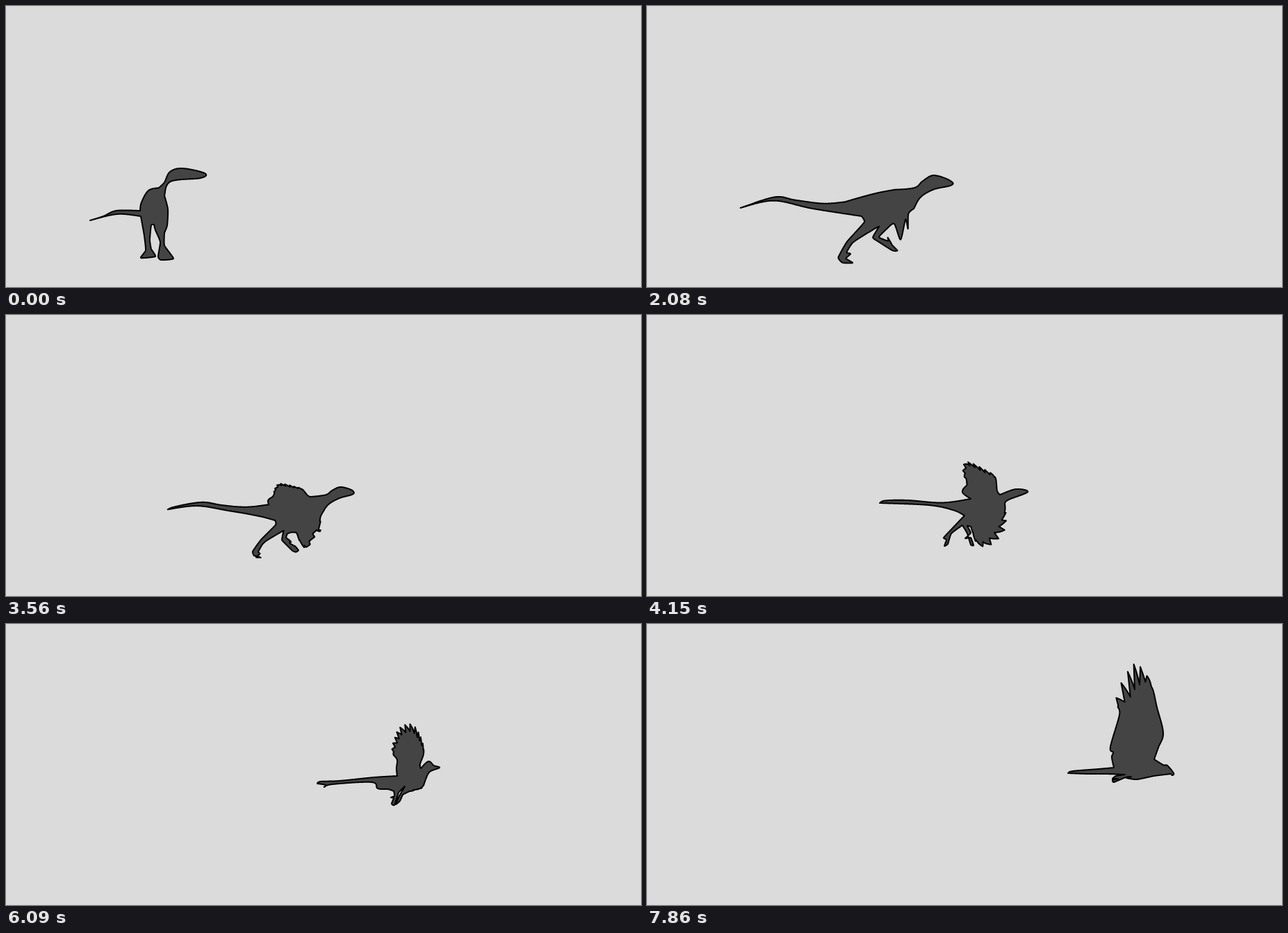
Animation, 914 px wide and 405 px high, one loop 8000 ms. Source, as an HTML page with a canvas:

```html
<!DOCTYPE html>
<html>
<head>
<meta charset="utf-8">
<style>
html, body { margin: 0; height: 100%; overflow: hidden; background: #dbdbdb; }
canvas { display: block; }
</style>
</head>
<body>
<canvas id="stage" width="914" height="405"></canvas>
<script>
// Key points clockwise from the tail tip; parts are split by "|":
// upper tail, back or wing, head, chest or far wing, front leg, back leg, lower tail.
// "~ from to count depth" adds feathers along that stretch of a part.
const theropod = `121,309 140,303 159,295 193,295
| 195,283 205,266 220,262
| 228,254 236,239 254,234 286,241 280,248 237,253 228,273
| 233,293 232,316 228,327
| 228,345 241,364 223,366 219,361 222,340 215,323 213,315
| 209,316 207,337 209,350 215,361 194,363 201,352 199,331 194,303
| 160,300 121,309`;

const raptor = `136,289 188,272.5 220,278 262,283.5 295,281
| 335,272 372,265
| 402,264.5 414,254 430,245 456,254 455,260 431,266 412,278 402,294
| 393,302 392,325 388,309 380,340 370,313 358,321
| 346,332 360,337 359,331 366,342 376,351 368,351 339,336 338,332 348,318
| 325,330 306,341 296,355 302,357 295,364 307,371 291,371 284,363 298,340 326,312 322,303
| 246,291 187,278 136,289`;

const glider = `335,271 343,267.5 375,267 425,270.5 466,265
| 455,257 455,251 461,243 458,230 461,218 469,219 488,228 501,235 504,253 508,259 ~ .24 .85 10 7
| 531,251 548,255 521,266 515,271
| 515,283 505,307 487,326 474,324 466,305 ~ .15 .9 7 11
| 461,304 466,314 458,322 466,321 470,332 466,331 461,315 454,303
| 438,315 433,330 428,333 431,324 427,321 438,309 457,289
| 440,281 405,274 335,271`;

const earlyBird = `448,230 453,227 480,226 530,221 563,219
| 562,208 563,196 558,187 562,174 572,158 586,157 596,171 601,186 596,202 597,208 ~ .22 .85 13 12
| 608,198 616,204 624,207 610,213 604,224
| 601,232 596,237 583,240 571,246 ~ .2 .9 5 2
| 567,255 561,260 566,248 574,234 565,243
| 559,261 555,259 558,251 554,250 559,248 558,241 550,238
| 535,237 526,228 470,231 458,235 460,232 448,230`;

const hawk = `606,215 613,212 650,209 672,207
| 669,192 671,185 667,177 680,131 678,118 690,112 701,101 716,85 727,92 734,120 743,157 736,178 730,195 ~ .36 .59 6 42
| 743,203 749,204 758,215 756,218 754,216
| 730,219 705,224 690,222
| 697,220 689,221 672,228 670,225 678,223
| 670,223 675,219 688,217
| 660,216 635,216 606,215`;

const SAMPLES = 200;
const ROUNDNESS = [.17, .17, .17, .12, .08, .08, .17];

const lerp = ([x, y], [u, v], t) => [x + (u - x) * t, y + (v - y) * t];
const mix = (a, b, t) => a.map((p, i) => lerp(p, b[i], t));

// Spline through the points as path data
function curve(pts, r) {
  const at = i => pts[Math.max(0, Math.min(pts.length - 1, i))];
  const handle = (i, dir) => [0, 1].map(a => at(i)[a] + dir * r * (at(i + 1)[a] - at(i - 1)[a]));
  return 'M' + pts[0] + pts.slice(1).map((p, i) => `C${handle(i, 1)} ${handle(i + 1, -1)} ${p}`).join('');
}

// Height of the feather edge at t: a sawtooth, longest in the middle
function feather(t, [from, to, count, depth]) {
  const s = (t - from) / (to - from) * count, n = Math.floor(s);
  if (n < 0 || n >= count) return 0;
  return depth * Math.sin(Math.PI * (n + .5) / count) * (1 - s + n);
}

// Evenly spaced points along every part, so that outlines can be mixed
function outline(text) {
  const path = document.createElementNS('http://www.w3.org/2000/svg', 'path');
  const out = [];
  let joint = [];
  text.split('|').forEach((part, n) => {
    const [line, fringe] = part.split('~').map(s => s.trim().split(/\s+/));
    const pts = [...joint, ...line.map(p => p.split(',').map(Number))];
    joint = pts.slice(-1);
    const root = lerp(pts[0], joint[0], .65);
    path.setAttribute('d', curve(pts, ROUNDNESS[n]));
    const length = path.getTotalLength();
    for (let i = 0; i < SAMPLES; i++) {
      const t = i / SAMPLES, { x, y } = path.getPointAtLength(t * length);
      const lift = fringe ? feather(t, fringe.map(Number)) : 0;
      out.push(lerp(root, [x, y], 1 + lift / Math.hypot(x - root[0], y - root[1])));
    }
  });
  return out;
}

// cubic-bezier(.25, .1, .25, 1)
function ease(u) {
  if (u <= 0) return 0;
  if (u >= 1) return 1;
  let lo = 0, hi = 1, s;
  for (let i = 0; i < 24; i++) {
    s = (lo + hi) / 2;
    if (.75 * s * (1 - s) + s ** 3 < u) lo = s; else hi = s;
  }
  return .3 * s * (1 - s) ** 2 + 3 * s * s * (1 - s) + s ** 3;
}

const LOOP = 8000, TICKS = 54, SPAN = 10.5;

// Eases away from one shape, passes the pose at the given tick and runs on to the end
function morph(start, from, tick, pose) {
  const progress = k => ease((k - start) / SPAN);
  const end = mix(from, outline(pose), 1 / progress(tick));
  return { start, end, shape: k => mix(from, end, progress(k)) };
}

const run = morph(7.5, outline(theropod), 18, raptor);
const leap = morph(21.2, run.end, 28, glider);
const flap = morph(34.2, leap.end, 41, earlyBird);
const soar = morph(47.5, flap.end, 53, hawk);
const morphs = [soar, flap, leap, run];

const ctx = document.getElementById('stage').getContext('2d');
ctx.fillStyle = '#444';
ctx.strokeStyle = '#000';
ctx.lineWidth = 2;
ctx.lineJoin = 'round';

let shown = -1;
function draw(now) {
  const tick = Math.floor(now % LOOP / LOOP * TICKS);
  if (tick !== shown) {
    shown = tick;
    const move = morphs.find(m => tick >= m.start) || run;
    ctx.clearRect(0, 0, 914, 405);
    ctx.beginPath();
    for (const [x, y] of move.shape(tick)) ctx.lineTo(x, y);
    ctx.closePath();
    ctx.fill();
    ctx.stroke();
  }
  requestAnimationFrame(draw);
}
requestAnimationFrame(draw);
</script>
</body>
</html>
```
